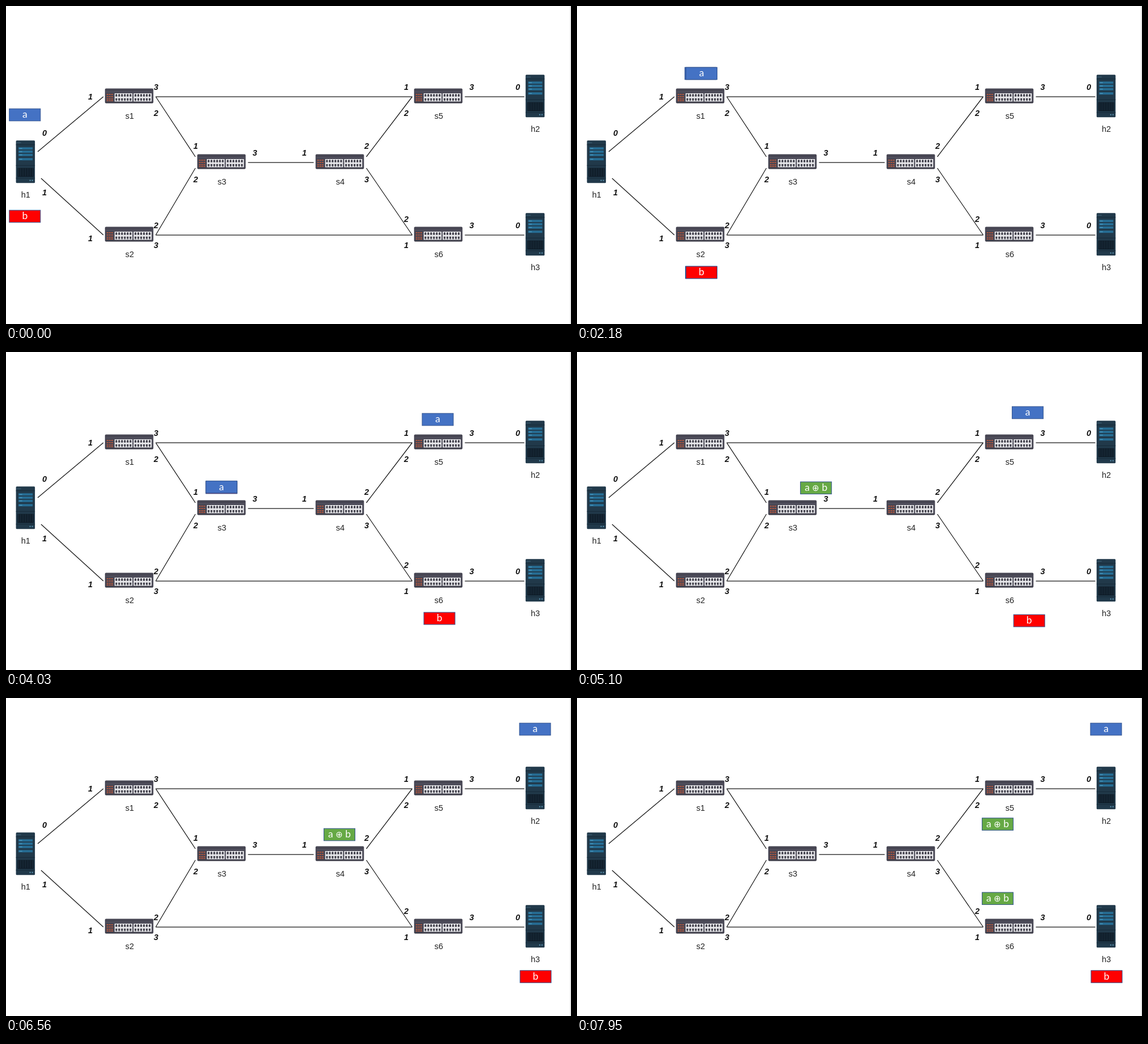
An HTML page for the animation above (8 s loop, 998 by 561 pixels).

```html
<!DOCTYPE html>
<html lang="en">
<head>
<meta charset="utf-8">
<title>Network coding</title>
<style>
  html, body { margin: 0; width: 100%; height: 100%; overflow: hidden; background: #fff; }
  svg { display: block; width: 100vw; height: 100vh; }
  text { text-anchor: middle; font-family: "Liberation Sans", Arial, sans-serif; font-size: 14.5px; }
  .name { fill: #222; }
  .port { font-weight: bold; font-style: italic; fill: #111; }
  .packet text { font: 17.5px Lato, "Open Sans", sans-serif; fill: #fff; }
  .packet .xor { font: 15px "DejaVu Sans", sans-serif; }
  .packet rect { stroke: #2f528f; }
  line { stroke: #151515; stroke-width: 1.25; }
</style>
</head>
<body>
<svg viewBox="0 0 998 561">
  <defs>
    <g id="switch">
      <rect width="85.5" height="26" rx="2" fill="#474653"/>
      <path d="M1 6H84.5" stroke="#5a5967"/>
      <path d="M1 25H84.5" stroke="#393843" stroke-width="1.5"/>
      <path d="M3 10.5h11M3 14.5h11M3 18.5h11M3 21.5h11" stroke="#a9553f" stroke-width="2" stroke-dasharray="3 1"/>
      <path d="M17 8.5h31.5v14.5h-31.5zM50.5 8.5h32v14.5h-32z" fill="#e8e8eb"/>
      <path d="M18.6 12.3h28.4M52.4 12.3h28.4M18.6 19h28.4M52.4 19h28.4" stroke="#3b3a45" stroke-width="3.6" stroke-dasharray="3 2"/>
      <path d="M19.4 10h27.6M53.2 10h27.6M19.4 21.3h27.6M53.2 21.3h27.6" stroke="#3b3a45" stroke-width="1.4" stroke-dasharray="1.4 3.6"/>
    </g>
    <g id="server">
      <rect width="33.5" height="75" rx="1.5" fill="#21394a"/>
      <path d="M0 7.5h33.5M0 44h33.5M0 66.5h33.5" stroke="#162a38"/>
      <path d="M1 4h8" stroke="#36566a" stroke-width="1.5"/>
      <path d="M4.5 14h25M4.5 19.7h25M4.5 25.4h25M4.5 33h25" stroke="#266d94" stroke-width="4"/>
      <path d="M6 14h5M6 19.7h5M6 25.4h5M6 33h5" stroke="#56a0c6"/>
      <rect x="3" y="48.5" width="28" height="15.5" fill="#0b1722"/>
      <path d="M4.5 56h25.5" stroke="#24394a" stroke-width="14" stroke-dasharray="1 2"/>
      <path d="M24 70.5h2M28 70.5h2" stroke="#5c98b6" stroke-width="2"/>
    </g>
  </defs>
  <path d="M997 0V561" stroke="#dcdcdc" stroke-width="1.5"/>
  <g id="net"></g>
  <g id="packets"></g>
</svg>
<script>
const net = document.getElementById("net");
const layer = document.getElementById("packets");
const TOP = 160, MID = 276, LOW = 404;
const SIDES = [-1, 1];

const draw = markup => net.insertAdjacentHTML("beforeend", markup);
const line = (x1, y1, x2, y2) => draw(`<line x1="${x1}" y1="${y1}" x2="${x2}" y2="${y2}"/>`);
const text = (cls, x, y, s) => draw(`<text class="${cls}" x="${x}" y="${y}">${s}</text>`);
const port = (digit, x, y) => text("port", x, y + 5, digit);

function node(kind, name, x, y) {
  const isSwitch = kind === "switch";
  const [left, up, below] = isSwitch ? [43.2, 14.4, 39] : [16.7, 38.7, 62.3];
  draw(`<use href="#${kind}" x="${x - left}" y="${y - up}"/>`);
  text("name", x + .5, y + below, name);
  return { x, y, reach: isSwitch ? 46.5 : 19 };
}

const h1 = node("server", "h1", 34.3, MID);
const h2 = node("server", "h2", 934.5, TOP);
const h3 = node("server", "h3", 934.5, LOW);
const s1 = node("switch", "s1", 218, TOP);
const s2 = node("switch", "s2", 218, LOW);
const s3 = node("switch", "s3", 381, MID);
const s4 = node("switch", "s4", 590, MID);
const s5 = node("switch", "s5", 764, TOP);
const s6 = node("switch", "s6", 764, LOW);

// the middle switches fan out slightly towards the outer rows
const fan = (p, q) => p.y === MID ? 10 * Math.sign(q.y - MID) : 0;
const link = (p, q) => line(p.x + p.reach, p.y + fan(p, q), q.x - q.reach, q.y + fan(q, p));
link(s1, s5);
link(s2, s6);
link(s3, s4);
for (const s of [s1, s2]) link(s, s3);
for (const s of [s5, s6]) link(s4, s);
link(s5, h2);
link(s6, h3);

for (const side of SIDES) {
  line(59 + 3 * side, 280.5 + 23.5 * side, 172, 282 + 122 * side);
  port(side < 0 ? 0 : 1, 68, 276.5 + 52.5 * side);
  port(1, 149, 285 + 125 * side);
}

// two ports on one side of a switch, upper and lower
function pair(s, dx, [upper, lower], up, down) {
  port(upper, s.x + dx, s.y - up);
  port(lower, s.x + dx, s.y + down);
}
pair(s1, 47, "32", 17, 29);
pair(s2, 47, "23", 17, 18);
pair(s3, -46, "12", 29, 30);
pair(s4, 47, "23", 29, 30);
pair(s5, -57, "12", 17, 29);
pair(s6, -57, "21", 28, 18);
for (const s of [s3, s5, s6]) port(3, s.x + 58.5, s.y - 17);
for (const h of [h2, h3]) port(0, h.x - 30.5, h.y - 17);
port(1, s4.x - 63, s4.y - 17);

const LOOP = 8000, FIRST = 150, STEP = 77.2;
const clamp = v => Math.min(1, Math.max(0, v));
const ease = u => u < .5 ? 2 * u * u : 1 - 2 * (1 - u) * (1 - u);

// one hop of the packets: begin and span in ms
const hops = [[120, 1880], [2333, 1750], [4564, 1750], [6673, 1700]];
const COPY = 2160, MIX = 4110, MIX_SPAN = 450, SPLIT = 6600;

const near = (n, dy, dx = 0) => ({ x: n.x + dx, y: n.y + dy });
const packets = [];

function packet(label, fill, firstHop, stops, from = 0, until = LOOP, fade = 0) {
  const el = document.createElementNS("http://www.w3.org/2000/svg", "g");
  el.setAttribute("class", "packet");
  el.innerHTML = `<rect x="-27.5" y="-10.75" width="55" height="21.5" fill="${fill}"/><text y="5.3">${label}</text>`;
  layer.append(el);
  packets.push({ el, firstHop, stops, from, until, fade });
}

const BLUE = "#4472c4", RED = "#ff0000", GREEN = "#66a945";
const XOR = 'a <tspan class="xor">⊕</tspan> b';
const mixed = MIX + MIX_SPAN;

packet("b", RED, 0, [near(h1, 95, -1), near(s2, 66, 1), near(s6, 66, 3), near(h3, 87.5, 1)]);
packet("a", BLUE, 0, [near(h1, -84, -1), near(s1, -41), near(s5, -41), near(h2, -105)]);
packet("b", RED, 1, [near(s2, 66, 2), near(s3, -37.5)], COPY, mixed);
packet("a", BLUE, 1, [near(s1, -41, 2), near(s3, -37.5)], COPY, mixed);
packet(XOR, GREEN, 2, [near(s3, -36.5, 2.5), near(s4, -35, -1), near(s5, 60)], MIX, LOOP, MIX_SPAN);
packet(XOR, GREEN, 3, [near(s4, -35, -1), near(s6, -35)], SPLIT);

function place({ firstHop, stops }, t) {
  let { x, y } = stops[0];
  stops.slice(1).forEach((stop, i) => {
    const [begin, span] = hops[firstHop + i];
    const k = ease(clamp((t - begin) / span));
    x += (stop.x - x) * k;
    y += (stop.y - y) * k;
  });
  return [x, y];
}

function render(time) {
  // the movement advances in fixed steps
  const t = FIRST + Math.floor((time - FIRST) / STEP) * STEP + 10;
  for (const p of packets) {
    const shown = t >= p.from && t < p.until;
    const alpha = p.fade ? clamp((t - p.from) / p.fade) : 1;
    p.el.setAttribute("transform", `translate(${place(p, t)})`);
    p.el.setAttribute("opacity", shown ? alpha : 0);
  }
}

const origin = performance.now();
function tick() {
  render((performance.now() - origin) % LOOP);
  requestAnimationFrame(tick);
}
tick();
</script>
</body>
</html>
```
